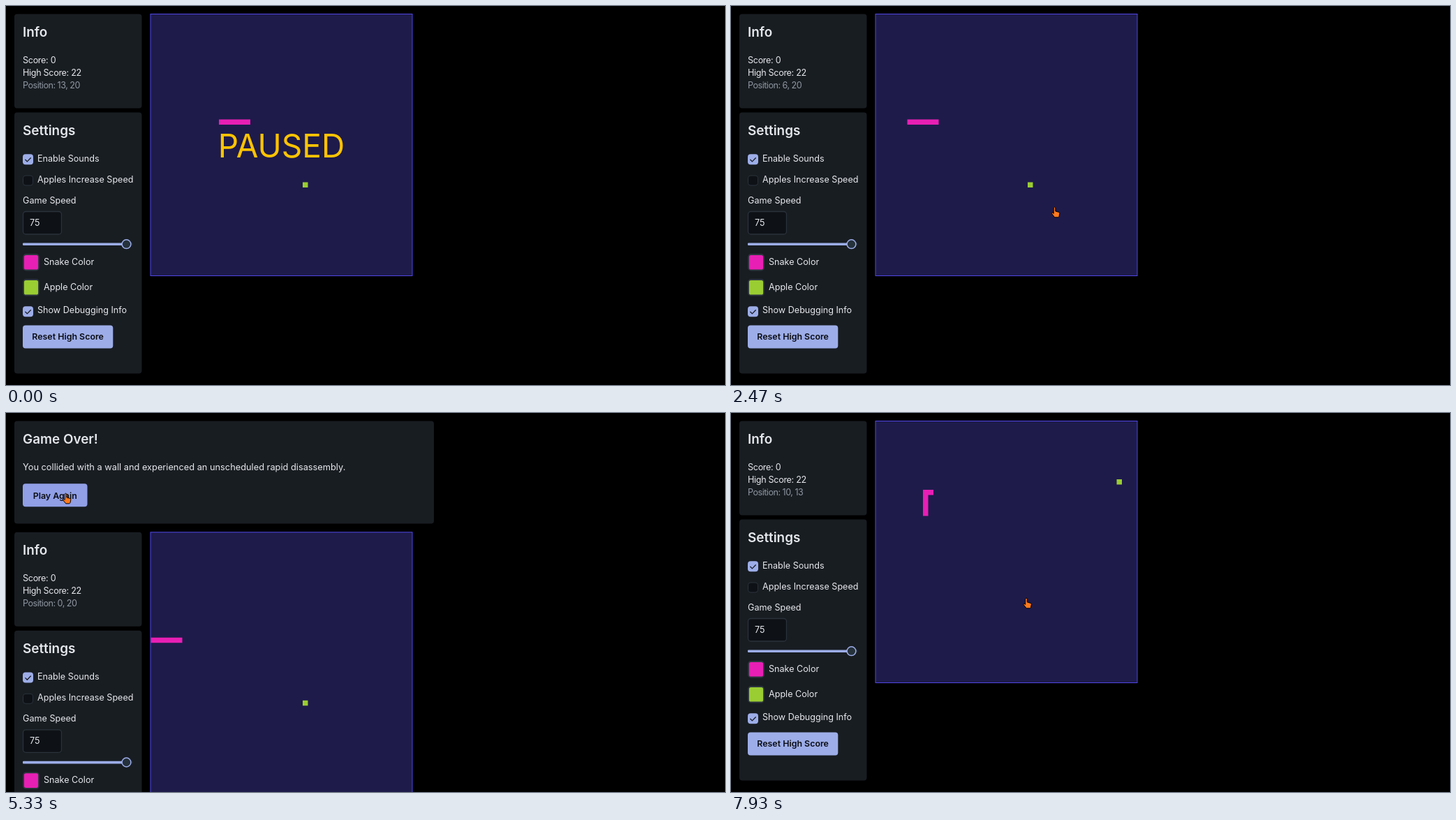
Animation of 1030x543 px, one loop 8 s. Source, as an HTML page:

```html
<!DOCTYPE html>
<html lang="en">
<head>
<meta charset="utf-8">
<title>Snake</title>
<style>
  html, body { margin: 0; width: 100%; height: 100%; overflow: hidden; background: #000; }
  svg { display: block; width: 1030px; height: 543px; }
  text { font: 400 12.6px Inter, "Open Sans", sans-serif; fill: #e6e8ec; white-space: pre; }
  .title { font-size: 18.9px; font-weight: 600; fill: #e4e7eb; }
  .message { font-size: 12.8px; }
  .button { font-size: 12.4px; font-weight: 600; fill: #0b0d14; text-anchor: middle; }
  .info { letter-spacing: -.32px; }
  .muted { letter-spacing: -.5px; fill: #9097a1; }
  .paused { font-size: 46px; fill: #ffc400; text-anchor: middle; }
  .card { fill: #181d22; }
  .primary { fill: #9dade8; }
  .field { fill: #0e1217; stroke: #2a323a; }
  .check { fill: none; stroke: #181c24; stroke-width: 1.3; stroke-linecap: round; stroke-linejoin: round; }
</style>
</head>
<body>
<svg viewBox="0 0 1030 543">
  <defs>
    <g id="checked">
      <rect class="primary" x="24" width="15" height="15" rx="4"/>
      <path class="check" d="M27.8 8l2.5 2.6 5-5.2"/>
    </g>
  </defs>

  <g id="modal">
    <rect class="card" x="12" y="11.5" width="601" height="147" rx="4"/>
    <text class="title" x="24" y="43.5">Game Over!</text>
    <text class="message" x="24" y="82">You collided with a wall and experienced an unscheduled rapid disassembly.</text>
    <rect id="again" class="primary" x="24" y="101.3" width="92.5" height="33" rx="4"/>
    <text class="button" x="70.2" y="122.5">Play Again</text>
  </g>

  <g id="page">
    <rect class="card" x="12" y="11.5" width="182.5" height="135" rx="4"/>
    <text class="title" x="24" y="43.5">Info</text>
    <text class="info" x="24" y="82">Score: 0</text>
    <text class="info" x="24" y="100">High Score: 22</text>
    <text class="muted" id="position" x="24" y="118"></text>

    <rect class="card" x="12" y="152.5" width="182.5" height="374" rx="4"/>
    <text class="title" x="24" y="184.5">Settings</text>
    <use href="#checked" y="212.3"/>
    <text x="45" y="223">Enable Sounds</text>
    <rect class="field" x="24.5" y="243" width="14" height="14" rx="3.5"/>
    <text x="45" y="253">Apples Increase Speed</text>
    <text x="24" y="283">Game Speed</text>
    <rect class="field" x="24.5" y="294.5" width="55" height="32.5" rx="4" stroke-width="1.3"/>
    <text x="34" y="315">75</text>
    <rect x="24" y="339.5" width="158" height="3.6" rx="1.8" fill="#222a32"/>
    <rect class="primary" x="24" y="339.5" width="149" height="3.6" rx="1"/>
    <circle cx="172.5" cy="341.2" r="6.4" fill="#25313b" stroke="#9dade8" stroke-width="1.5"/>
    <rect x="25" y="356" width="22" height="22.5" rx="3.5" fill="#e81fb4" stroke="#2d353e" stroke-width="1.8"/>
    <text x="54" y="371">Snake Color</text>
    <rect x="25" y="392" width="22" height="22.5" rx="3.5" fill="#9acd32" stroke="#2d353e" stroke-width="1.8"/>
    <text x="54" y="407">Apple Color</text>
    <use href="#checked" y="430.3"/>
    <text x="45" y="440">Show Debugging Info</text>
    <rect class="primary" x="24" y="457.5" width="129.3" height="33" rx="4"/>
    <text class="button" x="88.6" y="478">Reset High Score</text>

    <rect x="207" y="11.5" width="375" height="375" fill="#1e1b4b" stroke="#4f46e5"/>
    <path id="snake" fill="#e81fb4"/>
    <path id="apple" fill="#9acd32"/>
    <text id="paused" class="paused" x="394.5" y="217">PAUSED</text>
  </g>

  <path id="hand" fill="#ff7a1f" stroke="#000" stroke-width="1" stroke-linejoin="round"
    d="M-1.3 1Q0-.8 1.3 1V6L6.2 7.4Q7.5 8 7.3 9.4L6.5 13.4Q6.1 14.8 4.8 14.8H.2L-3.9 9.6Q-4.4 8-3 8L-1.3 9.4Z"/>
  <path id="beam" fill="none" stroke="#000" stroke-width="1.4" d="M-2.5-6.5H-.8L0-5.7.8-6.5H2.5M0-5.7V5.7M-2.5 6.5H-.8L0 5.7.8 6.5H2.5"/>
</svg>

<script>
const LOOP = 8000, TICK = 1000 / 15;
const CELL = 7.5, ORIGIN = [207.5, 12.5], LENGTH = 6;
const UNPAUSE = 29, OVER = 61, RESTART = 91;
const $ = id => document.getElementById(id);

// Pointer way points: tick, x, y
const POINTER = [
  [0, 1060, 575], [1, 984, 528], [4, 760, 405], [8, 370, 245], [11, 200, 186], [13, 310, 173],
  [16, 475, 202], [20, 250, 150], [23, 107, 86], [26, 258, 125], [27, 260, 125],
  [30, 300, 170], [37, 463.5, 288], [51, 463.5, 288], [52, 473, 288], [54, 473, 288],
  [59, 421, 285], [67, 222, 204], [71, 35, 150], [75, 85.5, 116], [79, 85.5, 116],
  [80, 85.5, 115], [93, 85.5, 115], [102, 423, 265], [120, 423, 265]
];

function pointerAt(tick) {
  const i = Math.max(1, POINTER.findIndex(p => p[0] >= tick));
  const [t0, x0, y0] = POINTER[i - 1], [t1, x1, y1] = POINTER[i];
  const k = (tick - t0) / (t1 - t0);
  return [x0 + (x1 - x0) * k, y0 + (y1 - y0) * k];
}

// Moves made since `from`: three ticks out of four advance the snake
function countMoves(from, to, rest) {
  let n = 0;
  for (let k = from; k <= to; k++) if (k % 4 !== rest) n++;
  return n;
}

function stepAt(tick) {
  if (tick < RESTART) return Math.min(20, 7 + countMoves(UNPAUSE, tick, 2));
  if (tick < 112) return countMoves(94, tick, 3);
  return tick < 119 ? Math.min(18, tick - 98) : 19;
}

const straight = step => [20 - step, 20];

function turning(step) {
  if (step <= 11) return straight(step);
  if (step <= 18) return [9, 31 - step];
  return [step - 9, 13];
}

function cellPath([col, row]) {
  return `M${ORIGIN[0] + col * CELL} ${ORIGIN[1] + row * CELL}h${CELL}v${CELL}h${-CELL}z`;
}

const show = (el, on) => el.setAttribute("visibility", on ? "visible" : "hidden");

function draw(time) {
  const tick = Math.floor((time + 3.4) / TICK);
  const second = tick >= RESTART, over = tick >= OVER && !second;
  const route = second ? turning : straight;
  const step = stepAt(tick), [col, row] = route(step);

  let body = "";
  for (let s = Math.max(0, step - LENGTH + 1); s <= step; s++) body += cellPath(route(s));
  $("snake").setAttribute("d", body);
  $("apple").setAttribute("d", cellPath(second ? [46, 11] : [29, 32]));
  $("position").textContent = `Position: ${col}, ${row}`;
  show($("paused"), tick < UNPAUSE);
  show($("modal"), over);
  $("page").setAttribute("transform", `translate(0 ${over ? 159.3 : 0})`);

  const [x, y] = pointerAt(tick);
  const hover = x > 24 && x < 116 && y > 101 && y < 134;
  $("again").style.fill = hover ? "#909fe6" : "";
  const onText = second && tick < 94;
  show($("hand"), !onText);
  show($("beam"), onText);
  $("hand").setAttribute("transform", `translate(${x} ${y})`);
  $("beam").setAttribute("transform", "translate(86.5 113)");
}

const start = performance.now();
function loop(now) {
  draw(Math.max(0, now - start) % LOOP);
  requestAnimationFrame(loop);
}
draw(0);
requestAnimationFrame(loop);
</script>
</body>
</html>
```
